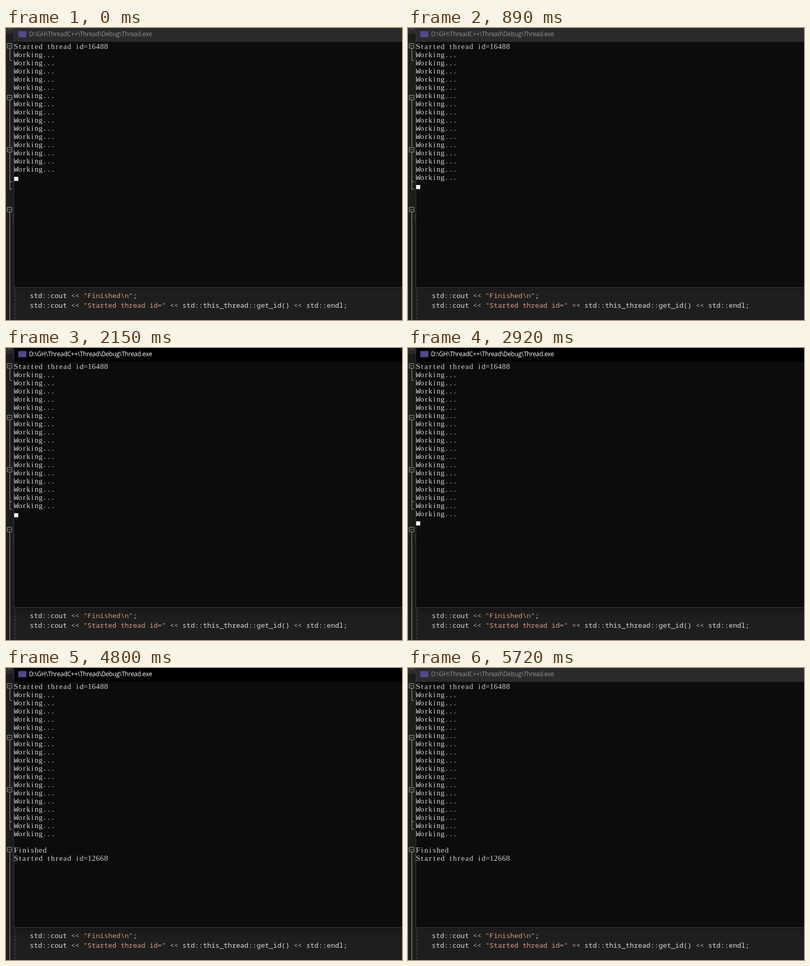
Write an HTML page that moves like this. It is 775x571 px and loops after 5800 ms.

```html
<!DOCTYPE html>
<html lang="en">
<head>
<meta charset="utf-8">
<title>Thread console</title>
<style>
  html, body { margin: 0; width: 100%; height: 100%; overflow: hidden; background: #1e1e1e; }
  #stage { position: absolute; left: 0; top: 0; width: 775px; height: 571px; overflow: hidden; }
  #stage > *, #console > * { position: absolute; }
  #editor { left: 0; top: 0; }
  #editor text { font: 500 13.46px "Noto Sans Mono", "DejaVu Sans Mono", monospace; fill: #dcdcdc; }
  #editor .op { fill: #b4b4b4; }
  #editor .str { fill: #d69d85; }

  #console, #bar, #lines, #cursor { animation: 5800ms step-end infinite; }
  #console {
    left: 15px; top: -2px; width: 780px; height: 508px;
    border: 1px solid #3c3c3c; background: #0c0c0c;
    animation-name: shade;
  }
  #bar {
    left: 0; top: 1px; width: 100%; height: 27px;
    font: 12px/24px "Open Sans", "Noto Sans", sans-serif;
    letter-spacing: -.25px;
    animation-name: focus;
  }
  #bar span { position: absolute; left: 29px; top: 0; white-space: pre; }
  #bar i { position: absolute; left: 8px; top: 6px; width: 16px; height: 12px; background: #55468a; }
  #lines { left: 0; top: 30px; width: 200px; overflow: hidden; animation-name: print; }
  #lines svg { display: block; }
  #lines text {
    font: 15px "Liberation Serif", "Times New Roman", serif;
    text-anchor: middle; fill: #d4d4d4;
  }
  #lines .wide { font-family: "Liberation Mono", "Courier New", monospace; }
  #cursor {
    left: 0; top: 36px; width: 8px; height: 8px; background: #f2f2f2;
    animation-name: caret;
  }

  @keyframes print {
    0% { height: 256px; }
    15.344% { height: 272px; }
    32.758% { height: 288px; }
    50.344% { height: 304px; }
    67.758%, 100% { height: 352px; }
  }
  @keyframes caret {
    0% { transform: translateY(256px); opacity: 1; }
    15.344% { transform: translateY(272px); opacity: 1; }
    32.758% { transform: translateY(288px); opacity: 1; }
    46.206% { transform: translateY(288px); opacity: 0; }
    50.344% { transform: translateY(304px); opacity: 1; }
    63.62% { transform: translateY(304px); opacity: 0; }
    65.172% { transform: translateY(320px); opacity: 1; }
    67.758% { transform: translateY(352px); opacity: 1; }
    82.758% { transform: translateY(352px); opacity: 0; }
    90.689% { transform: translateY(352px); opacity: 1; }
    98.62%, 100% { transform: translateY(352px); opacity: 0; }
  }
  @keyframes focus {
    0%, 98.62%, 100% { background: #2b2b2b; color: #929292; }
    37.068% { background: #000; color: #fff; }
  }
  @keyframes shade {
    0%, 98.62%, 100% { box-shadow: 0 2px 8px rgba(0, 0, 0, .22); }
    37.068% { box-shadow: 0 5px 16px rgba(0, 0, 0, .32); }
  }
</style>
</head>
<body>
<div id="stage">
  <svg id="editor" width="775" height="571">
    <rect width="775" height="571" fill="#1e1e1e"/>
    <rect width="15" height="11" fill="#2d2d30"/>
    <path d="M3 4.5L7 .5L11 4.5" fill="none" stroke="#777"/>
    <g id="folds" fill="none" stroke="#a5a5a5">
      <path d="M7.5 40V63.5H12M7.5 141V232M7.5 243V315.5H12M7.5 300.5H12M7.5 360V571"/>
    </g>
    <path d="M15 364.5H13.5V378.5H15" fill="none" stroke="#444"/>
    <path d="M17.5 509V571" stroke="#5a5a5a" stroke-dasharray="4 3"/>
    <text x="46.6" y="528">std::cout <tspan class="op">&lt;&lt;</tspan> <tspan class="str">"Finished\n"</tspan>;</text>
    <text x="46.6" y="547">std::cout <tspan class="op">&lt;&lt;</tspan> <tspan class="str">"Started thread id="</tspan> <tspan class="op">&lt;&lt;</tspan> std::this_thread::get_id() <tspan class="op">&lt;&lt;</tspan> std::endl;</text>
  </svg>
  <div id="console">
    <div id="bar"><i></i><span>D:\GH\ThreadC++\Thread\Debug\Thread.exe</span></div>
    <div id="lines"><svg width="200" height="352"></svg></div>
    <div id="cursor"></div>
  </div>
</div>
<script>
  const CELL = 8, ROW = 16;
  const output = [
    'Started thread id=16488',
    ...Array(18).fill('Working...'),
    '',
    'Finished',
    'Started thread id=12668'
  ];

  // Each character is centred in its own console cell
  const printLine = (line, row) => {
    const xs = [...line].map((_, col) => col * CELL + CELL / 2 - .3).join(' ');
    const glyphs = line.replace('W', '<tspan class="wide">W</tspan>');
    return `<text x="${xs}" y="${row * ROW + 12}">${glyphs}</text>`;
  };
  document.querySelector('#lines svg').innerHTML = output.map(printLine).join('');

  // Collapse boxes in the editor margin
  const foldBox = y => `<path fill="#1e1e1e" d="M2.5 ${y + .5}h9v9h-9zM4.5 ${y + 5}h5"/>`;
  document.getElementById('folds').innerHTML += [30, 131, 233, 350].map(foldBox).join('');
</script>
</body>
</html>
```
